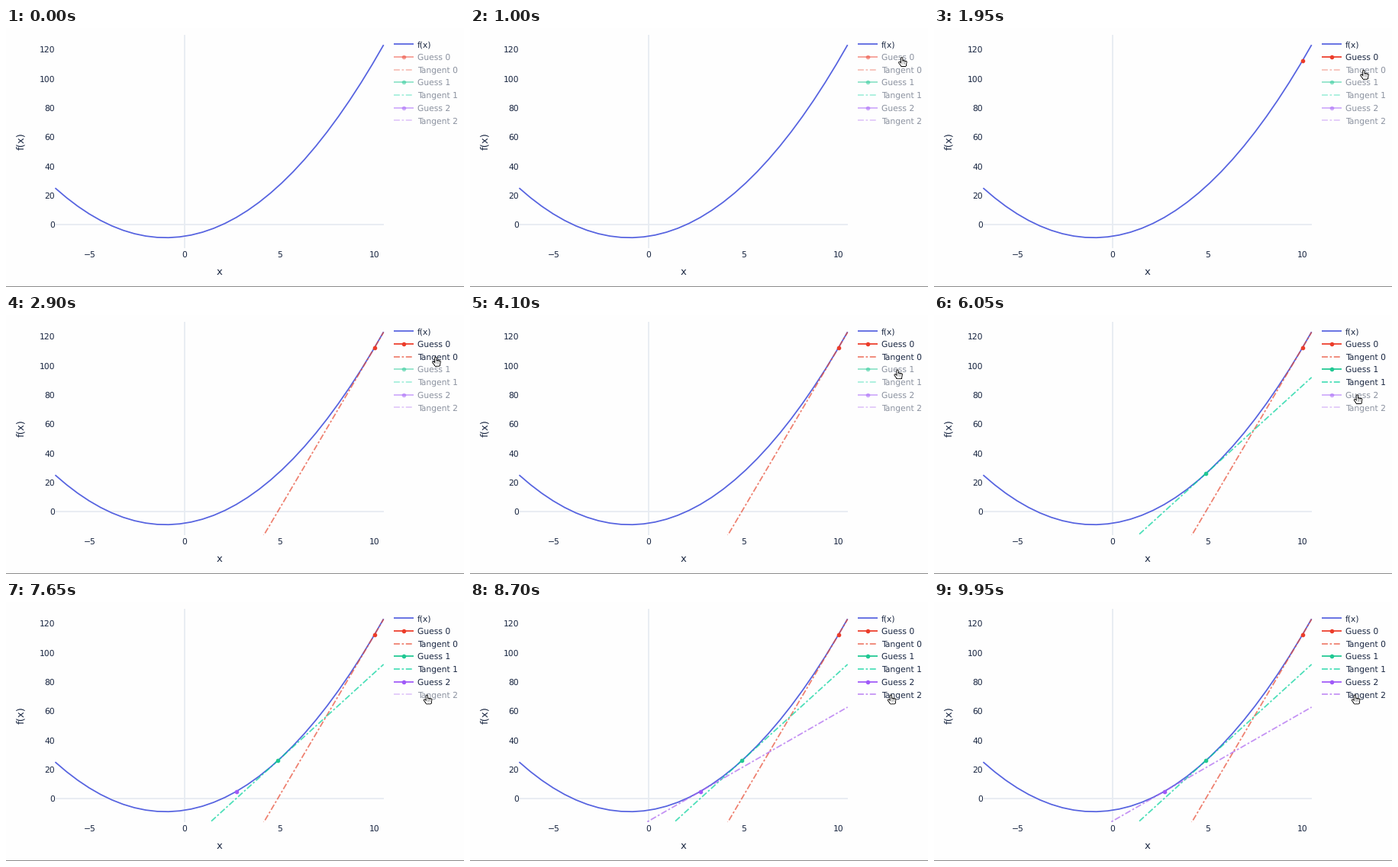
Recreate the animation shown at these times as a matplotlib script. Size 600 by 340 pixels, loop 10000 ms.

```python
import numpy as np
import matplotlib.pyplot as plt
from matplotlib.animation import FuncAnimation
from matplotlib.patches import Rectangle

W, H, DPI = 600, 340, 100
STEP, FRAMES = 50, 200          # ms per frame, frames per loop
PT = 72 / DPI                   # points per pixel
SCALE = 0.879                   # zoom of the recorded chart
DASHDOT = (0, (4.5, 1.5, 1.5, 1.5))
INK, BLUE, GRID = "#1b2843", "#5663e0", "#e7ebf2"
LEFT, RIGHT, TOP, BOTTOM = 65, 495, 9.3, 289
X_MIN, X_MAX = -6.83, 10.49
TICK, TITLE = 10.75 * PT, 13.3 * PT

plt.rcParams["font.family"] = "DejaVu Sans"
plt.rcParams["text.hinting"] = "none"
fig = plt.figure(figsize=(W / DPI, H / DPI), dpi=DPI, facecolor="#fefefe")
ax = fig.add_axes([0, 0, 1, 1])
ax.set_xlim(0, W)
ax.set_ylim(H, 0)
ax.axis("off")


def px(x):
    return 234.1 + 24.84 * x


def py(y):
    return 258 - 1.917 * y


def f(x):
    return x**2 + 2 * x - 8


def slope(x):
    return 2 * x + 2


def label(x, y, text, size=TICK, va="baseline", **kw):
    return ax.text(x, y, text, color=INK, fontsize=size, va=va, **kw)


def line(xs, ys, color, **kw):
    return ax.plot(xs, ys, color=color, lw=2 * SCALE * PT,
                   solid_capstyle="butt", **kw)[0]


def dot(x, y, color, **kw):
    return ax.plot([x], [y], "o", color=color, ms=5.6 * PT, mew=0, **kw)[0]


# Axes
line([px(0)] * 2, [TOP, BOTTOM], GRID, zorder=1)
line([LEFT, RIGHT], [py(0)] * 2, GRID, zorder=1)
for v in range(0, 121, 20):
    label(LEFT - 1, py(v) + 4.1, str(v), ha="right")
for v in range(-5, 11, 5):
    label(px(v), 300.8, str(v).replace("-", "\u2212"), ha="center")
label((LEFT + RIGHT) / 2 - 0.5, 324, "x", TITLE, ha="center")
label(20.3, 148.3, "f(x)", TITLE, ha="center", va="center", rotation=90)
ax.add_patch(Rectangle((0, H - 1.3), W, 1.3, color="#8c8c8c", lw=0))

# Curve
plot_area = Rectangle((LEFT, TOP), RIGHT - LEFT, BOTTOM - TOP,
                      transform=ax.transData)
grid = np.linspace(X_MIN, X_MAX, 30)
line(px(grid), py(f(grid)), BLUE, zorder=2)


def row_y(row):
    return 21.2 + 19 * SCALE * row


def legend_row(row, text, color, alpha=1, ink_alpha=1, dashed=False, marker=False):
    y, x0, width = row_y(row), 508, 30 * SCALE
    parts = [line([x0, x0 + width], [y, y], color, alpha=alpha,
                  ls=DASHDOT if dashed else "-"),
             label(x0 + 35 * SCALE, y + 3.9, text, alpha=ink_alpha)]
    if marker:
        parts.append(dot(x0 + width / 2, y, color, alpha=alpha))
    return parts


def toggle_row(row, text, color, alpha, **kw):
    """Legend entry in its bright and its dimmed look."""
    return (legend_row(row, text, color, alpha, **kw),
            legend_row(row, text, color, alpha / 2, 0.5, **kw))


legend_row(0, "f(x)", BLUE)

# Newton steps: each adds a guess and its tangent
entries = []                    # (artists when on, artists when off)
guess = 10.0
colors = [("#ec3c2a", "#e84a32"), ("#20c893", "#00d29b"), ("#a05af8", "#ab63f0")]
for i, (dot_color, line_color) in enumerate(colors):
    m, y0 = slope(guess), f(guess)

    on, off = toggle_row(2 * i + 1, f"Guess {i}", dot_color, 1, marker=True)
    on.append(dot(px(guess), py(y0), dot_color, zorder=5))
    entries.append((on, off))

    on, off = toggle_row(2 * i + 2, f"Tangent {i}", line_color, 0.7, dashed=True)
    ends = np.array([X_MIN, X_MAX])
    tangent = line(px(ends), py(y0 + m * (ends - guess)), line_color,
                   ls=DASHDOT, alpha=0.7, zorder=3)
    tangent.set_clip_path(plot_area)
    on.append(tangent)
    entries.append((on, off))

    guess -= y0 / m


# Hand pointer: index, three folded fingers, thumb and palm as round strokes
def strokes():
    yield (0, 1.6), (0, 11)
    for k in range(1, 4):
        yield (1.8 * k, 5.2 + 0.4 * k), (1.8 * k - 0.3 * k, 11)
    yield (-2.9, 7.3), (0, 11)
    yield (0, 11), (4.5, 11)


GAP = (np.nan, np.nan)
HAND = np.array([p for a, b in strokes() for p in (a, b, GAP)])
hand = [ax.plot([], [], color=c, lw=w * PT, solid_capstyle="round", zorder=z)[0]
        for c, w, z in (("black", 3.2, 10), ("white", 1.4, 11))]


def click_time(row):
    return 120 + 1380 * row


def pointer(t):
    """Drift in from the right, then step down the rows after each click."""
    pos = np.array([W + 8, 62.0])
    for row in range(1, 7):
        u = np.clip((t - click_time(row - 1) - 100) / 350, 0, 1)
        stop = np.array([568.5 - 2.85 * row, row_y(row) + 0.2])
        pos = pos + (stop - pos) * u * u * (3 - 2 * u)
    return pos


def draw(n):
    t = n * STEP
    for row, (on, off) in enumerate(entries, 1):
        clicked = t >= click_time(row)
        for artist in on:
            artist.set_visible(clicked)
        for artist in off:
            artist.set_visible(not clicked)
    for stroke in hand:
        stroke.set_data(*(HAND + pointer(t)).T)
    return []


anim = FuncAnimation(fig, draw, frames=FRAMES, interval=STEP,
                     init_func=lambda: draw(0), repeat=True, repeat_delay=0)
plt.show()
```
